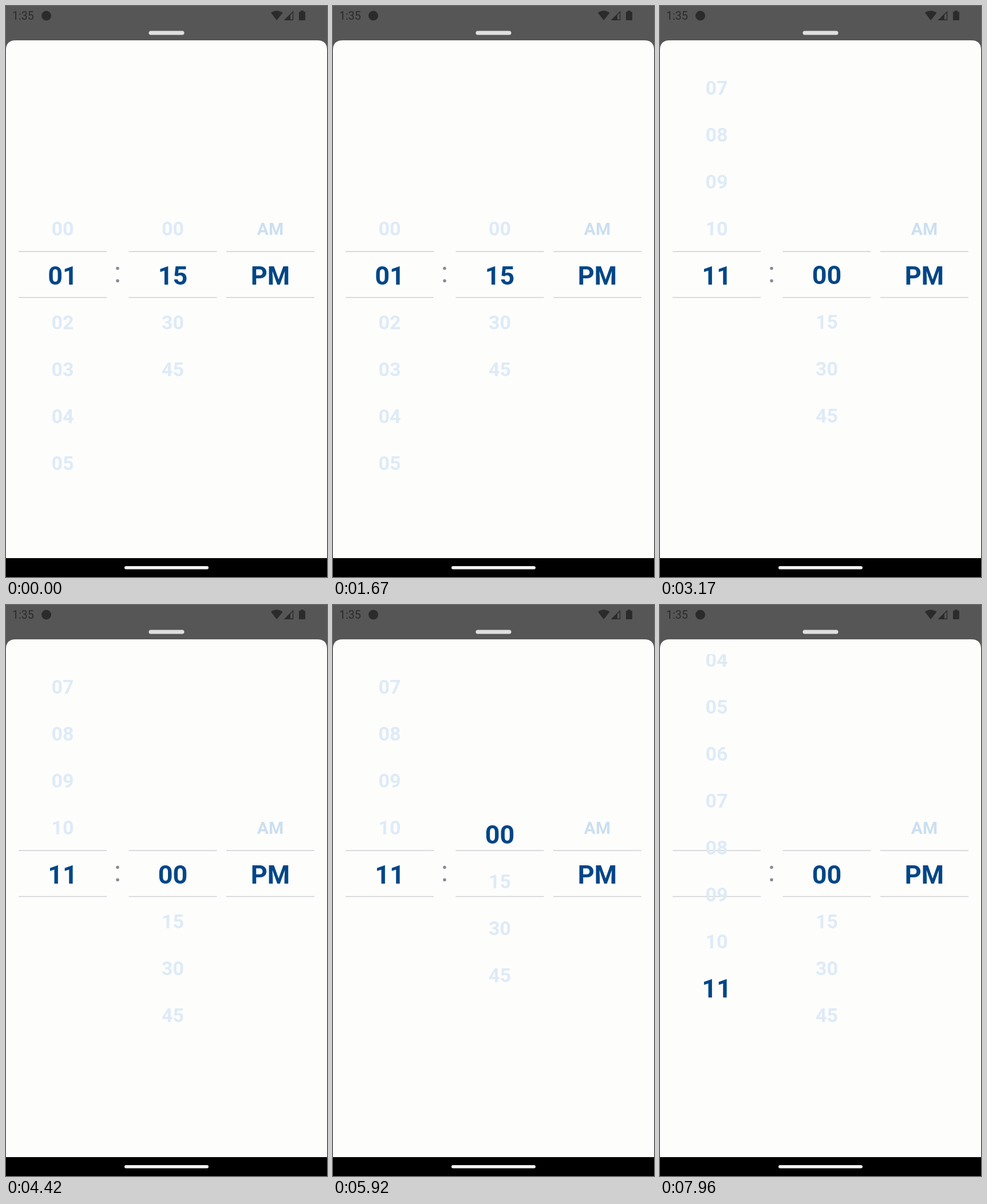
An HTML page for the animation above (8000 ms loop, 561 px wide and 998 px high).

```html
<!DOCTYPE html>
<html lang="en">
<head>
<meta charset="utf-8">
<title>Time picker</title>
<style>
  html, body { margin: 0; width: 100%; height: 100%; overflow: hidden; background: #565656; }
  svg { display: block; width: 100vw; height: 100vh; }
  text { font-family: Roboto, sans-serif; }
  .item { font-weight: 700; text-anchor: middle; fill: #deebf7; }
  .period { fill: #cbdff0; }
  .selected { font-size: 45px; fill: #004686; }
</style>
</head>
<body>
<svg viewBox="0 0 561 998">
  <defs><clipPath id="viewport"><rect y="86" width="561" height="771"/></clipPath></defs>
  <rect width="561" height="998" fill="#565656"/>

  <g fill="#2b2b2b">
    <text x="11" y="24" font-size="19.6">1:35</text>
    <circle cx="70.5" cy="17" r="8.5"/>
    <path d="M463 12Q473 4.500 483.500 12L473.200 25Z"/>
    <path d="M486 25L497 14V25Z"/>
    <path d="M487.500 24.300L501.500 10.300V24.300Z" fill="none" stroke="#2b2b2b" stroke-width="1.400"/>
    <path d="M515 8h5v2h2q1 0 1 1v13q0 1-1 1h-9q-1 0-1-1v-13q0-1 1-1h2z"/>
  </g>

  <rect x="249.500" y="43.500" width="62" height="7" rx="3.500" fill="#dfdfdf"/>
  <path d="M0 966V77Q0 60 17 60H544Q561 60 561 77V966Z" fill="#fdfdfc"/>
  <rect y="965" width="561" height="33"/>
  <rect x="207" y="979" width="147" height="5.500" rx="2.750" fill="#f3f3f3"/>

  <path d="M22 429.300h154M214.500 429.300h154M385 429.300h154M22 509.500h154M214.500 509.500h154M385 509.500h154"
        stroke="#d0d0d3" stroke-width="1.600"/>
  <g fill="#8b8b94"><circle cx="195" cy="458.500" r="2.800"/><circle cx="195" cy="480.300" r="2.800"/></g>
  <g id="columns" clip-path="url(#viewport)"></g>
</svg>

<script>
const LOOP = 8000, PITCH = 82, CENTER = 471.3;
const CAP_HALF = 0.3555;   // half the cap height, in em

const ease = {
  in: u => u * u,
  out: u => 1 - (1 - u) ** 2,
  both: u => u * u * (3 - 2 * u)
};

const range = (count, step) =>
  Array.from({ length: count }, (_, i) => String(i * step).padStart(2, '0'));

// scrolls: [start, end, from, to, easing]; picks: [time, selected index]
const columns = [
  {
    x: 99, size: 34, labels: range(12, 1),
    scrolls: [
      [1800, 2460, 1, 6.24, 'in'],
      [2460, 2920, 6.24, 11, 'out'],
      [7630, 8000, 11, 8.5, 'both']
    ],
    picks: [[0, 1], [2960, 11]]
  },
  {
    x: 291.5, size: 34, labels: range(4, 15),
    scrolls: [
      [2810, 3214, 1, 0, 'out'],
      [5780, 6180, 0, 3, 'both'],
      [6500, 6880, 3, 0, 'both']
    ],
    picks: [[0, 1], [3130, 0], [6220, 3], [6960, 0]]
  },
  {
    x: 462, size: 30, labels: ['AM', 'PM'], style: 'period',
    scrolls: [
      [4680, 5040, 1, -0.11, 'both'],
      [5130, 5260, -0.11, 0, 'out'],
      [5400, 5700, 0, 1, 'both']
    ],
    picks: [[0, 1], [5280, 0], [5740, 1]]
  }
];

function make(tag, parent) {
  return parent.appendChild(document.createElementNS('http://www.w3.org/2000/svg', tag));
}

for (const column of columns) {
  column.group = make('g', document.getElementById('columns'));
  column.items = column.labels.map(label => {
    const item = make('text', column.group);
    item.textContent = label;
    item.setAttribute('x', column.x);
    item.setAttribute('font-size', column.size);
    return item;
  });
}

function positionAt(scrolls, t) {
  const current = scrolls.filter(s => s[0] <= t).pop();
  if (!current) return scrolls[0][2];
  const [start, end, from, to, easing] = current;
  return from + (to - from) * ease[easing](Math.min(1, (t - start) / (end - start)));
}

function draw(now) {
  const t = now % LOOP;
  for (const { group, items, scrolls, picks, size, style = '' } of columns) {
    const selected = picks.filter(p => p[0] <= t).pop()[1];
    group.setAttribute('transform', `translate(0 ${CENTER - positionAt(scrolls, t) * PITCH})`);
    items.forEach((item, i) => {
      const active = i === selected;
      item.setAttribute('class', `item ${active ? 'selected' : style}`);
      item.setAttribute('y', i * PITCH + CAP_HALF * (active ? 45 : size));
    });
  }
}

const begin = performance.now();
function tick() {
  draw(performance.now() - begin);
  requestAnimationFrame(tick);
}
tick();
</script>
</body>
</html>
```
